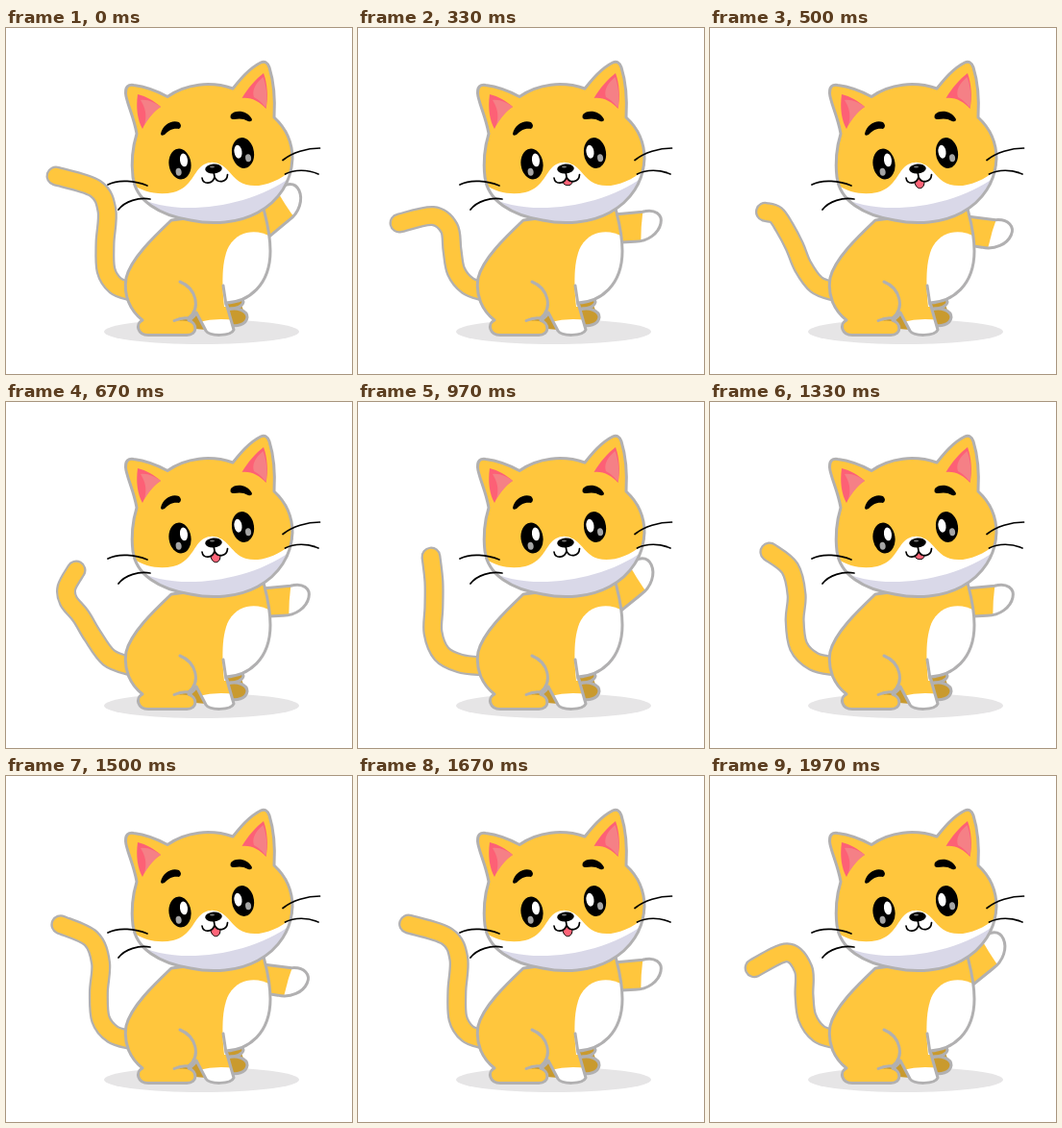
An HTML page that plays this animation: 360 px wide and 360 px high, repeating every 2030 ms.

```html
<!DOCTYPE html>
<html lang="en">
<head>
<meta charset="utf-8">
<title>Waving cat</title>
<style>
  html, body { margin: 0; width: 100%; height: 100%; overflow: hidden; background: #fff; }
  svg { display: block; width: 100vw; height: 100vh; }
  .line { stroke: #b1b0b1; stroke-width: 3; stroke-linejoin: round; stroke-linecap: round; }
  .fur { fill: #ffc63d; }
  .gold { fill: #c99a2e; }
  .open { fill: none; }
  .ink { fill: none; stroke: #000; stroke-width: 1.7; stroke-linecap: round; }
</style>
</head>
<body>
<svg viewBox="0 0 360 360">
  <defs>
    <path id="headShape" d="M136 110C133 92 125 77 124.500 68Q124 58 133 59.500C145 61 158 66 168 71.500C187 58 213 55 236 63C244 53 253 42 265 36Q271 33 274 41C279 57 280 76 279 93C291 104 298 118 298 136C297 160 284 180 262 192C242 203 215 205 192 200C160 195 135 180 132 155C130 138 132 123 136 110Z"/>
    <path id="armShape" d="M256 195L296 191C309 187 317 194 315 203C313 213 302 222 288 222L256 224Z"/>
    <path id="bodyShape" d="M172 200C153 218 130 240 125 260C122 278 129 294 142 304C134 308 137 319.500 148 319.500L188 319.500C200 319 199 307 190 304C194 302 197 299 198 296L208 315C212 321 234 321 237 314L229 286C252 285 275 268 275 232C275 213 271 200 268 188Z"/>
    <clipPath id="headClip"><use href="#headShape"/></clipPath>
    <clipPath id="armClip"><use href="#armShape"/></clipPath>
    <clipPath id="bodyClip"><use href="#bodyShape"/></clipPath>
  </defs>

  <ellipse cx="203.500" cy="316" rx="101.500" ry="13" fill="#e6e5e6"/>

  <g fill="none" stroke-linecap="round" stroke-linejoin="round">
    <path class="tail" stroke="#b1b0b1" stroke-width="21"/>
    <path class="tail" stroke="#ffc63d" stroke-width="16.500"/>
  </g>

  <g id="arm">
    <use href="#armShape" class="fur"/>
    <path d="M297 185Q294 205 294.500 228H325V185Z" fill="#fff" clip-path="url(#armClip)"/>
    <use href="#armShape" class="line open"/>
  </g>

  <g class="gold">
    <path d="M228 284L242 281L248 296L234 312Z"/>
    <path class="line" d="M228 284C238 279 246 280 247 285C246 290 240 292 231 292Z"/>
    <path class="line" d="M231 293C240 290 251 294 251 301C250 309 239 311 233 309Z"/>
  </g>

  <use href="#bodyShape" class="fur"/>
  <g clip-path="url(#bodyClip)" fill="#fff">
    <path d="M227 290C224 262 225 240 232 227C243 209 263 210 275 217L280 260L245 290Z"/>
    <path d="M200 306Q219 301 238 304V325H200Z"/>
  </g>
  <path class="gold" d="M177 305C186 304 193 299 196 294L208 314L197 313C196 306 188 303 177 305Z"/>
  <use href="#bodyShape" class="line open"/>
  <path class="line open" d="M181 264C198 271 203 291 190 302Q183 301 175 304.500M226 268L229 288"/>

  <use href="#headShape" class="fur"/>
  <g clip-path="url(#headClip)">
    <path d="M128 160C143 172 160 174 174 171C194 166 195 148 206 142Q215 137 225 143C234 149 238 160 250 163C264 167 286 160 302 143V210H128Z" fill="#fff"/>
    <path d="M136 175C170 196 250 190 298 154V212H136Z" fill="#d9d8e8"/>
  </g>
  <g fill="#fd6076">
    <path d="M137 69C146 71 154 76 161 82C152 88 146 96 142 105C137 96 135 84 137 69Z"/>
    <path d="M268 47C260 53 252 62 245.500 73C256 72 264 77 270.500 84C273 72 272 58 268 47Z"/>
  </g>
  <g fill="#f58086">
    <path d="M140 75C148 74 155 78 161 82C153 87 148 95 144 101C147 91 145 83 140 75Z"/>
    <path d="M267.500 51C258 59 256 66 258 72C264 75 267 79 270.500 83C272.500 72 271 60 267.500 51Z"/>
  </g>
  <use href="#headShape" class="line open"/>

  <path d="M161 110C163 100 173 95 180 98Q184 102 180 105C173 104 169 107 165 111Q161 113 161 110Z"/>
  <path d="M234 90C238 85 251 85 256 95Q256 98 252 97C247 94 243 94 237 95Q232 95 234 90Z"/>

  <g transform="rotate(-8 181 141.500)">
    <ellipse cx="181" cy="141.500" rx="11.500" ry="16"/>
    <ellipse cx="185.500" cy="138" rx="4" ry="7" fill="#fff"/>
    <ellipse cx="178.500" cy="149.500" rx="3" ry="4" fill="#a5a5a5"/>
  </g>
  <g transform="rotate(-8 246.500 130)">
    <ellipse cx="246.500" cy="130" rx="11.500" ry="16"/>
    <ellipse cx="241.700" cy="128" rx="4" ry="7" fill="#fff"/>
    <ellipse cx="251.300" cy="136" rx="3" ry="4" fill="#a5a5a5"/>
  </g>

  <path class="ink" d="M106 163C117 157 135 159 147 164M117 189C124 180 138 176 150 178M288 137.500C298 129.500 313 125 326.500 125M290.500 152C300 147 314 147 325 152"/>

  <path id="tongue" fill="#ff6478" stroke="#000" stroke-width="1"/>
  <path class="ink" d="M204 156C205 163 215 163 217 155C220 162 230 161 230.500 152.500M216 149L217 155"/>
  <ellipse cx="216" cy="146.500" rx="8.800" ry="4.900" transform="rotate(-5 216 146.500)"/>
  <ellipse cx="214.500" cy="144.500" rx="2.500" ry="1" fill="#777"/>
</svg>

<script>
const LOOP = 2030, STEP = 100 / 3, LAST_STEP = 59;
const WAVE = 1000, TAIL_PERIOD = 1690;

// Tail centre line from base to tip, at each key time.
const tailKeys = [
  [0,    [130,274, 114,268, 104,252, 103,224, 105,190, 93,167, 52,154]],
  [280,  [130,274, 113,268, 101,251, 98,228, 97,201, 80,184, 46,200]],
  [330,  [130,274, 114,268, 102,253, 98,231, 95,208, 78,195.5, 43,203]],
  [667,  [130,275, 107,266, 90,243, 78,223, 65,207, 63,193, 73,175]],
  [970,  [130,275, 106,272, 87,262, 78,240, 79,214, 79,187, 76,161]],
  [1330, [130,275, 108,270, 92,254, 88,227, 90,201, 83,173, 62,156]]
];

const tails = document.querySelectorAll('.tail');
const arm = document.getElementById('arm');
const tongue = document.getElementById('tongue');

const smooth = (a, b, t) => {
  const u = Math.min(1, Math.max(0, (t - a) / (b - a)));
  return u * u * (3 - 2 * u);
};

function keyAt(i) {
  const n = tailKeys.length, lap = Math.floor(i / n);
  const [time, pose] = tailKeys[i - lap * n];
  return { time: time + lap * TAIL_PERIOD, pose };
}

// Monotone cubic interpolation: no overshoot where a point turns back.
function slope(a, b, c, j) {
  const s = (b.pose[j] - a.pose[j]) / (b.time - a.time);
  const r = (c.pose[j] - b.pose[j]) / (c.time - b.time);
  return s * r <= 0 ? 0 : 2 * s * r / (s + r);
}

function tailPose(time) {
  const t = time % TAIL_PERIOD;
  let i = 0;
  while (keyAt(i + 1).time <= t) i++;
  const [a, b, c, d] = [-1, 0, 1, 2].map(k => keyAt(i + k));
  const span = c.time - b.time, u = (t - b.time) / span;
  return b.pose.map((from, j) => {
    const e = u * u * (3 - 2 * u);
    return from + (c.pose[j] - from) * e
      + span * u * (1 - u) * ((1 - u) * slope(a, b, c, j) - u * slope(b, c, d, j));
  });
}

function curveThrough(flat) {
  const pts = [];
  for (let i = 0; i < flat.length; i += 2) pts.push([flat[i], flat[i + 1]]);
  const at = i => pts[Math.min(pts.length - 1, Math.max(0, i))];
  let path = 'M' + pts[0];
  for (let i = 0; i < pts.length - 1; i++) {
    const [p, q, r, s] = [-1, 0, 1, 2].map(k => at(i + k));
    const c1 = q.map((v, k) => v + (r[k] - p[k]) / 6);
    const c2 = r.map((v, k) => v - (s[k] - q[k]) / 6);
    path += `C${c1} ${c2} ${r}`;
  }
  return path;
}

function draw(time) {
  const line = curveThrough(tailPose(time));
  tails.forEach(el => el.setAttribute('d', line));

  const phase = time % WAVE;
  const angle = -36 + 48.6 * (1 - Math.cos(2 * Math.PI * phase / WAVE)) / 2;
  arm.setAttribute('transform', `rotate(${angle} 257.5 201.5)`);

  const open = smooth(200, 450, phase) * (1 - smooth(690, 930, phase));
  const low = 160 + 9 * open;
  tongue.setAttribute('d', `M213 160Q216 159 217 156Q219 160 223 160C223 ${low} 214 ${low} 213 160Z`);
  tongue.style.display = open > 0.02 ? '' : 'none';
}

function tick() {
  const t = performance.now() % LOOP;
  draw(Math.min(LAST_STEP, Math.floor((t + 3.4) / STEP)) * STEP);
  requestAnimationFrame(tick);
}
tick();
</script>
</body>
</html>
```
